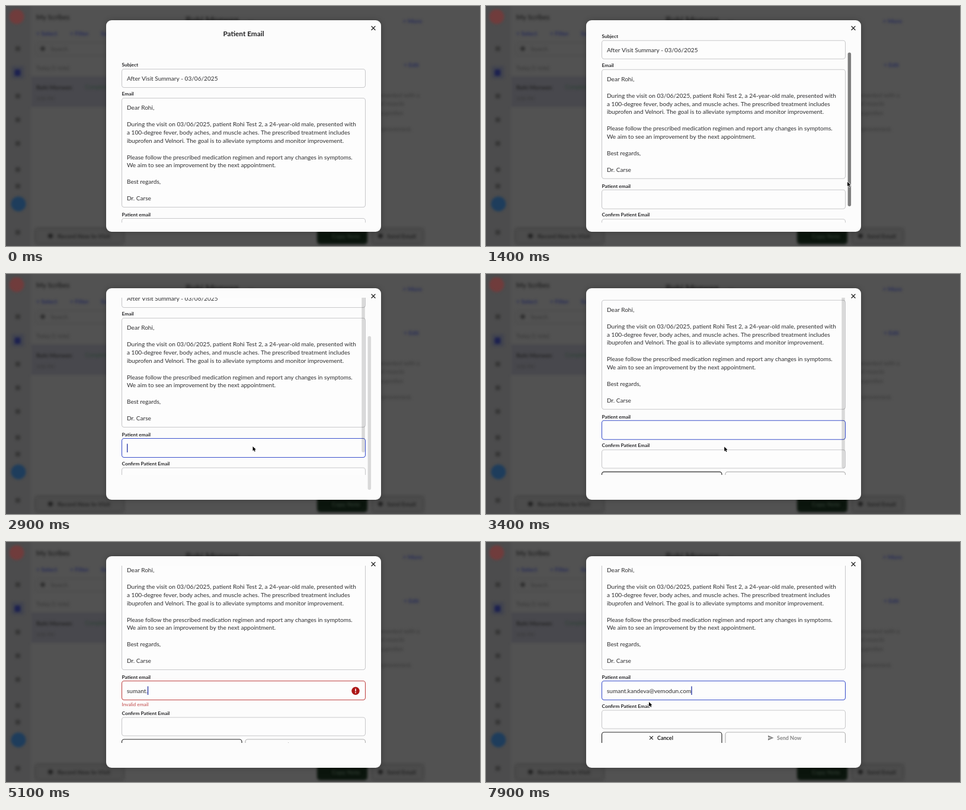
Recreate the animation shown at these times as an HTML page with a canvas. Size 800 px wide and 405 px high, loop 8000 ms.

```html
<!DOCTYPE html>
<html lang="en">
<head>
<meta charset="utf-8">
<title>Patient Email</title>
<style>
  html, body { margin: 0; width: 100%; height: 100%; overflow: hidden; background: #525252; }
  canvas { display: block; width: 800px; height: 405px; }
</style>
</head>
<body>
<canvas id="stage"></canvas>
<script>
const W = 800, H = 405, LOOP = 8000;
const FONT = 'Lato, "Open Sans", sans-serif';
const INK = '#2e2e30', LINE = '#c9c9cb', BLUE = '#3d52cc', RED = '#c04545';
const BODY_SIZE = 10.08;
const EMAIL = 'sumant.kandeva@vemodun.com';
const BODY = [
  'Dear Rohi,', '',
  'During the visit on 03/06/2025, patient Rohi Test 2, a 24-year-old male, presented with',
  'a 100-degree fever, body aches, and muscle aches. The prescribed treatment includes',
  'ibuprofen and Velnori. The goal is to alleviate symptoms and monitor improvement.', '',
  'Please follow the prescribed medication regimen and report any changes in symptoms.',
  'We aim to see an improvement by the next appointment.', '',
  'Best regards,', '',
  'Dr. Carse'
];

// Scroll limits, and times in ms
const OUTER = 81, INNER = 43;
const FOCUS = 2750, TYPE = 4250, TYPED = 7500;
const KEYS = [[TYPE, 0], [5080, 7], [5680, 14], [5900, 14.2], [6980, 21], [7480, 26]];
const CURSOR = [
  [100, 612, 391], [400, 612, 391], [900, 610, 258], [950, 610, 258],
  [1750, 610, 323], [2200, 610, 323], [2650, 416.5, 291], [3100, 416.5, 291],
  [3650, 391.5, 292], [7520, 391.5, 292], [7900, 275, 270], [8000, 275, 270]
];

const canvas = document.getElementById('stage');
const dpr = window.devicePixelRatio || 1;
canvas.width = W * dpr;
canvas.height = H * dpr;
const ctx = canvas.getContext('2d');

const clamp = v => Math.min(1, Math.max(0, v));
const ramp = (t, a, b) => clamp((t - a) / (b - a));
const smooth = u => u * u * (3 - 2 * u);

// Value of a [time, ...values] track at time t
function track(keys, t, col, ease = u => u) {
  let i = 0;
  while (i < keys.length - 2 && t >= keys[i + 1][0]) i++;
  const a = keys[i], b = keys[i + 1];
  return a[col] + (b[col] - a[col]) * ease(ramp(t, a[0], b[0]));
}

function text(c, str, x, y, size, color = INK, weight = 400, align = 'left') {
  c.font = `${weight} ${size}px ${FONT}`;
  c.fillStyle = color;
  c.textAlign = align;
  c.fillText(str, x, y);
}

function box(c, x, y, w, h, r, fill, stroke, lw = 1) {
  c.beginPath();
  c.roundRect(x, y, w, h, r);
  if (fill) { c.fillStyle = fill; c.fill(); }
  if (stroke) { c.strokeStyle = stroke; c.lineWidth = lw; c.stroke(); }
}

function disc(c, x, y, r, color) {
  c.beginPath();
  c.arc(x, y, r, 0, 7);
  c.fillStyle = color;
  c.fill();
}

function cross(x, y, r, color, lw) {
  ctx.beginPath();
  ctx.moveTo(x - r, y - r); ctx.lineTo(x + r, y + r);
  ctx.moveTo(x + r, y - r); ctx.lineTo(x - r, y + r);
  ctx.strokeStyle = color;
  ctx.lineWidth = lw;
  ctx.stroke();
}

function clipTo(x, y, w, h) {
  ctx.beginPath();
  ctx.rect(x, y, w, h);
  ctx.clip();
}

// The dimmed page behind the dialog, drawn once
function makePage() {
  const page = document.createElement('canvas');
  page.width = W * dpr;
  page.height = H * dpr;
  const c = page.getContext('2d');
  const dark = '#222', grey = '#363636', blue = '#262b58';
  c.scale(dpr, dpr);
  c.fillStyle = '#525252';
  c.fillRect(0, 0, W, H);
  c.filter = `blur(${2 * dpr}px)`;
  c.fillStyle = '#4c4c4d';
  c.fillRect(-9, -9, 50, H + 18);
  c.fillStyle = '#48484d';
  c.fillRect(42, 119, 140, 51);

  disc(c, 18, 18, 12.5, '#703c3c');
  disc(c, 21, 334, 12.5, '#1e3d5c');
  box(c, 9, 101, 22, 22, 4, '#43454f');
  box(c, 14.5, 107, 10, 11, 2, '#1c2150');
  for (const y of [72, 152, 192, 232, 276, 304, 382]) box(c, 16, y - 4, 8, 8, 2, '#363636');

  text(c, 'My Scribes', 51, 23, 11.5, dark, 700);
  text(c, '+ Select', 51, 50, 10, blue, 700);
  text(c, '+ Filter', 108, 50, 10, blue, 700);
  text(c, 'Sort', 160, 50, 10, blue, 700);
  box(c, 50, 62, 150, 22, 4, null, '#4b4b4b');
  disc(c, 62, 72, 4, '#303030');
  text(c, 'Search', 75, 76, 10, grey);
  text(c, 'Today (1 note)', 51, 108, 9, grey);
  text(c, 'Rohi Morwen', 51, 141, 10, dark, 700);
  text(c, 'Complete', 134, 140, 9, '#2a4032');
  text(c, '3:06 PM', 51, 159, 8, grey);

  text(c, 'Rohi Morwen', 303, 29, 15, dark, 700);
  text(c, '...', 408, 27, 14, dark, 700);
  text(c, '+ More', 702, 29, 10, blue, 700, 'right');
  text(c, '+ Edit', 697, 103, 10, blue, 700, 'right');
  const notes = [['presented with a', 698, 154], ['and muscle', 672, 168],
    ['ibuprofen', 670, 184], ['improvement.', 685, 211]];
  for (const [str, x, y] of notes) text(c, str, x, y, 10, grey, 400, 'right');

  box(c, 49, 375, 150, 27, 5, '#4c4c4c', '#383838');
  disc(c, 75, 388, 4, dark);
  text(c, 'Record New In-Visit', 87, 392, 10, dark, 700);
  box(c, 525, 375, 85, 27, 5, '#0b150d');
  text(c, 'Copy Note', 550, 392, 10, '#2f3b31', 700);
  box(c, 617, 375, 88, 27, 5, '#4c4c4c', '#3a3a3a');
  disc(c, 632, 388, 4, dark);
  text(c, 'Send Email', 643, 392, 10, dark, 700);

  // Dialog shadow
  c.filter = 'none';
  c.shadowColor = 'rgba(0,0,0,0.25)';
  c.shadowBlur = 10 * dpr;
  box(c, 169, 24, 464, 357, 9, '#fcfcfc');
  return page;
}
const page = makePage();

const label = (str, y) => text(ctx, str, 195.5, y, 8.35, '#262628', 700);
const field = (y, h, color = LINE) => box(ctx, 195.5, y + 0.5, 411, h, 4, '#fdfdfd', color, 1.1);

function alertIcon(x, y) {
  disc(ctx, x, y, 6.7, '#ad1717');
  ctx.fillStyle = '#fff';
  ctx.fillRect(x - 0.8, y - 3.8, 1.6, 4.7);
  disc(ctx, x, y + 2.9, 0.95, '#fff');
}

function plane(x, y, color) {
  ctx.beginPath();
  ctx.moveTo(x - 4.5, y - 4.2);
  ctx.lineTo(x + 5, y);
  ctx.lineTo(x - 4.5, y + 4.2);
  ctx.lineTo(x - 4.5, y + 1);
  ctx.lineTo(x + 1.5, y);
  ctx.lineTo(x - 4.5, y - 1);
  ctx.fillStyle = color;
  ctx.fill();
}

function form(t) {
  const count = Math.floor(track(KEYS, t, 1) + 1e-6);
  const typed = EMAIL.slice(0, count);
  const focused = t >= FOCUS;
  const invalid = count > 0 && count < 25;
  const drop = invalid ? 12 : 0;

  label('Subject', 102);
  field(106, 31);
  text(ctx, 'After Visit Summary - 03/06/2025', 204, 126, BODY_SIZE);
  label('Email', 151);
  field(155, 184);
  BODY.forEach((str, i) => text(ctx, str, 204, 175 + i * 13.92, BODY_SIZE));

  label('Patient email', 355);
  field(358, 32, invalid ? RED : focused ? BLUE : LINE);
  text(ctx, typed, 204, 379, BODY_SIZE);
  if (focused) {
    const since = t < TYPE ? t - FOCUS : t < TYPED ? 0 : t - TYPED;
    if (since % 1000 < 500) {
      ctx.fillStyle = '#2f3da8';
      ctx.fillRect(204 + ctx.measureText(typed).width, 367.5, 1.4, 14.5);
    }
  }
  if (invalid) {
    alertIcon(590, 375.3);
    text(ctx, 'Invalid email', 195.5, 401, 8.3, RED);
  }

  label('Confirm Patient Email', 403.5 + drop);
  field(407.5 + drop, 31);
  const y = 445 + drop;
  box(ctx, 195.5, y, 202.5, 31, 4, null, '#2a2a2a', 1.2);
  cross(279, y + 9.5, 2.9, '#222', 1.2);
  text(ctx, 'Cancel', 289, y + 13, 9, '#222', 700);
  box(ctx, 404, y, 202.5, 31, 4, null, '#b4b4b4', 1.2);
  plane(480.5, y + 9.5, '#858585');
  text(ctx, 'Send Now', 491, y + 13, 9, '#858585', 700);
}

function bar(x, y, h, alpha) {
  if (alpha > 0) box(ctx, x, y, 5.5, h, 2.75, `rgba(0,0,0,${alpha})`);
}

function cursor(x, y) {
  ctx.save();
  ctx.translate(x, y);
  ctx.beginPath();
  ctx.moveTo(0, 0);
  ctx.lineTo(0, 7.6);
  ctx.lineTo(1.8, 6);
  ctx.lineTo(3, 8.7);
  ctx.lineTo(4.3, 8.1);
  ctx.lineTo(3.1, 5.5);
  ctx.lineTo(5.4, 5.3);
  ctx.closePath();
  ctx.strokeStyle = '#fff';
  ctx.lineWidth = 1.4;
  ctx.stroke();
  ctx.fillStyle = '#000';
  ctx.fill();
  ctx.restore();
}

function draw(t) {
  const outer = OUTER * smooth(ramp(t, 950, 1750));
  const inner = INNER * smooth(ramp(t, 3050, 3600));

  ctx.setTransform(dpr, 0, 0, dpr, 0, 0);
  ctx.drawImage(page, 0, 0, W, H);

  ctx.save();
  clipTo(169, 40, 464, 325.5);
  ctx.save();
  ctx.translate(0, -outer);
  text(ctx, 'Patient Email', 401, 51, 11.8, '#1f1f21', 700, 'center');
  clipTo(169, 87, 464, 333);
  ctx.translate(0, -inner);
  form(t);
  ctx.translate(0, inner);
  bar(600.3, 88 + inner * 0.885, 294, 0.14 * ramp(t, 1850, 2000) * (1 - ramp(t, 4050, 4250)));
  ctx.restore();
  const held = 1 - ramp(t, 2200, 2400);
  bar(610.6, 40 + outer * 0.8, 259.5, (0.14 + 0.36 * held) * ramp(t, 900, 1000) * (1 - ramp(t, 2920, 3000)));
  ctx.restore();

  cross(620, 37.3, 3.4, '#1c1c1c', 1.3);
  if (t >= 100 && (t < TYPE || t >= 7520)) {
    const ease = t < 7520 ? smooth : undefined;
    cursor(track(CURSOR, t, 1, ease), track(CURSOR, t, 2, ease));
  }
}

const start = performance.now();
function tick() {
  draw((performance.now() - start) % LOOP);
  requestAnimationFrame(tick);
}
tick();
</script>
</body>
</html>
```
